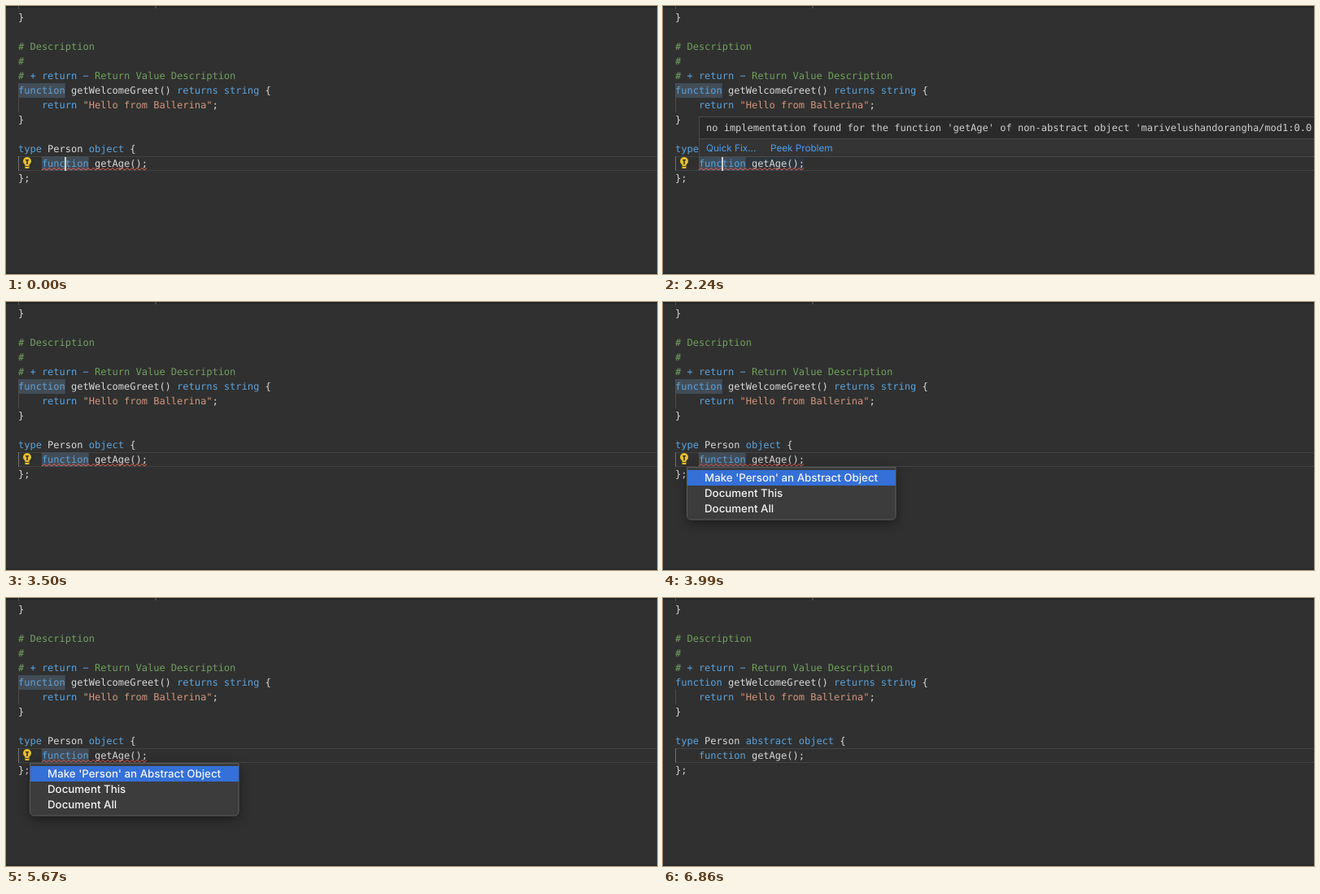
These frames come from a looping animation (800x330 px, 6.93 s). An HTML page with a canvas:

```html
<!DOCTYPE html>
<html lang="en">
<head>
<meta charset="utf-8">
<title>Code action demo</title>
<style>
  html, body { margin: 0; width: 100%; height: 100%; overflow: hidden; background: #303030; }
  canvas { display: block; }
</style>
</head>
<body>
<canvas id="stage" width="800" height="330"></canvas>
<script>
const ctx = document.getElementById('stage').getContext('2d');
const LOOP = 6930, STEP = 70;
const LEFT = 15, CHAR = 7.224, ROW = 18, TOP = 5;
const MONO = '12px "DejaVu Sans Mono", monospace';
const UI = 'Inter, "Liberation Sans", sans-serif';
const BG = '#303030', KEY = '#5ba3dc', PLAIN = '#d8d8d8', NOTE = '#70a05f', STR = '#d0967c';

// Times in ms
const HOVER_IN = 560, HOVER_OUT = 2660;
const MENU_IN = 3780, PICK = 3990, MENU_FADE = 5740, MENU_OUT = 5950;
const EDIT = 6300, FIXED = 6720;

const colX = col => LEFT + col * CHAR;
const rowY = row => TOP + row * ROW;

function rect(x, y, w, h, color) {
  ctx.fillStyle = color;
  ctx.fillRect(x, y, w, h);
}

function text(str, x, y, color, font = MONO) {
  ctx.font = font;
  ctx.fillStyle = color;
  ctx.fillText(str, x, y);
}

// Draws alternating text and colour arguments on one row
function code(row, col, ...parts) {
  for (let i = 0; i < parts.length; i += 2) {
    text(parts[i], colX(col), rowY(row) + 13, parts[i + 1]);
    col += parts[i].length;
  }
}

function drawCode(edited) {
  code(0, 0, '}', PLAIN);
  code(2, 0, '# Description', NOTE);
  code(3, 0, '#', NOTE);
  code(4, 0, '# ', NOTE, '+ return \u2212 ', KEY, 'Return Value Description', NOTE);
  code(5, 0, 'function', KEY, ' getWelcomeGreet() ', PLAIN, 'returns string', KEY, ' {', PLAIN);
  code(6, 4, 'return ', KEY, '"Hello from Ballerina"', STR, ';', PLAIN);
  code(7, 0, '}', PLAIN);
  code(9, 0, 'type', KEY, ' Person ', PLAIN, edited ? 'abstract object' : 'object', KEY, ' {', PLAIN);
  code(10, 4, 'function', KEY, ' getAge();', PLAIN);
  code(11, 0, '};', PLAIN);
}

function drawFrame() {
  rect(0, 0, 800, 330, BG);
  rect(0, 0, 800, 2, '#232323');
  rect(15, 0, 1, 4, '#505050');
  rect(183, 0, 2, 3, '#484848');
  rect(0, 328, 800, 2, '#292929');
  rect(LEFT, rowY(10), 785, 1, '#424242');
  rect(LEFT, rowY(10) + 17, 785, 1, '#424242');
  rect(LEFT, rowY(6), 1, ROW, '#4c4c4c');
  rect(LEFT, rowY(10), 1, ROW, '#707070');
}

function drawSquiggle() {
  ctx.beginPath();
  for (let x = 44; x <= 174; x += 3) ctx.lineTo(x, (x - 44) % 6 ? 199.5 : 202);
  ctx.strokeStyle = '#e8604f';
  ctx.lineWidth = 1;
  ctx.stroke();
}

function drawBulb() {
  ctx.fillStyle = '#e8c02c';
  ctx.beginPath();
  ctx.arc(26, 191, 5, 0, 7);
  ctx.fill();
  rect(23.5, 194, 5, 6, '#e8c02c');
  rect(24, 189, 4, 1.3, BG);
  rect(25.2, 190, 1.6, 5, BG);
  rect(23.5, 197, 5, 0.8, BG);
}

function drawHover(alpha) {
  ctx.globalAlpha = alpha;
  rect(44, 136, 756, 50, '#494949');
  rect(45, 137, 755, 26, '#2a2a2a');
  rect(45, 164, 755, 21, '#343434');
  text("no implementation found for the function 'getAge' of non-abstract object " +
    "'marivelushandorangha/mod1:0.0.1:Person'", 53, 154, '#cfcfcf');
  text('Quick Fix...', 53, 179, '#4a9ff0', '11.7px ' + UI);
  text('Peek Problem', 132, 179, '#4a9ff0', '11.7px ' + UI);
  ctx.globalAlpha = 1;
}

function drawMenu(alpha, picked) {
  ctx.globalAlpha = alpha;
  ctx.save();
  ctx.shadowColor = 'rgba(0,0,0,.45)';
  ctx.shadowBlur = 14;
  ctx.shadowOffsetY = 4;
  ctx.fillStyle = '#3c3c3c';
  ctx.beginPath();
  ctx.roundRect(30, 203.5, 256, 64.5, [0, 0, 5, 5]);
  ctx.fill();
  ctx.restore();
  ctx.strokeStyle = '#5c5c5c';
  ctx.lineWidth = 1;
  ctx.beginPath();
  ctx.roundRect(29.5, 203.5, 256.5, 64.5, [0, 0, 5, 5]);
  ctx.stroke();
  if (picked) rect(30, 207, 256, 19, '#3470d8');
  ["Make 'Person' an Abstract Object", 'Document This', 'Document All'].forEach((label, i) =>
    text(label, 51, 221 + i * 19, '#f4f4f4', '500 13.3px ' + UI));
  ctx.globalAlpha = 1;
}

function draw(t) {
  const edited = t >= EDIT;
  const hover = t >= HOVER_IN && t < HOVER_OUT;
  const caret = edited ? t < 6580 : t % 1000 < 500;
  drawFrame();
  if (!edited) {
    rect(LEFT, rowY(5), 8 * CHAR, ROW, '#424c57');
    rect(colX(4), rowY(10), 8 * CHAR, ROW, '#424c57');
    drawBulb();
  }
  if (hover) rect(colX(4), rowY(10), 18 * CHAR, ROW, 'rgba(38,79,120,.15)');
  drawCode(edited);
  if (t < FIXED) drawSquiggle();
  if (caret) rect(72, rowY(10) + 1, 2, 17, '#d0d0d0');
  if (hover) drawHover(Math.min(1, (t - HOVER_IN + STEP) / 210));
  if (t >= MENU_IN && t < MENU_OUT) {
    drawMenu(t < MENU_FADE ? 1 : Math.max(0, (5930 - t) / 210), t >= PICK);
  }
}

function tick() {
  const t = performance.now() % LOOP;
  ctx.textRendering = 'geometricPrecision';
  draw(Math.floor(t / STEP) * STEP);
  requestAnimationFrame(tick);
}
tick();
</script>
</body>
</html>
```
